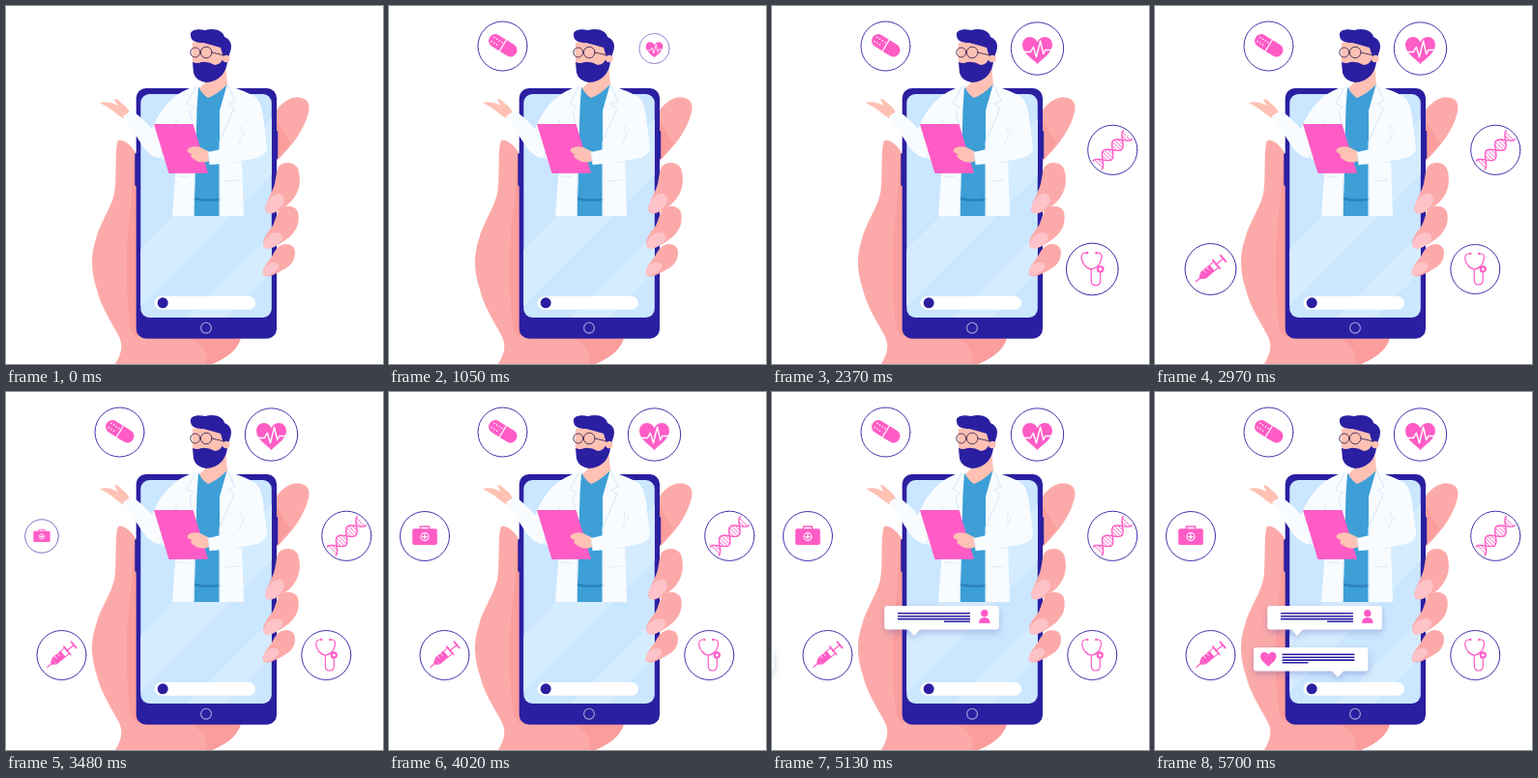
An HTML page with a canvas that plays this animation: 390 by 370 pixels, repeating every 6300 ms.

```html
<!DOCTYPE html>
<html lang="en">
<head>
<meta charset="utf-8">
<title>Online doctor</title>
<style>
html, body { margin: 0; width: 100%; height: 100%; overflow: hidden; background: #fff; }
canvas { display: block; width: 390px; height: 370px; }
</style>
</head>
<body>
<canvas id="stage" width="390" height="370"></canvas>
<script>
const ctx = document.getElementById('stage').getContext('2d');
const LOOP = 6300;
const NAVY = '#2b1fa1', PINK = '#ff5cc6', WHITE = '#fff';
const HAND = '#fcaaa9', HAND_DARK = '#fa9d9c', NAIL = '#fdc3c8';
const SKIN = '#fec1b4', COAT = '#f8fcff', FOLD = '#dcecfa', SHIRT = '#3d9fd6';

function fill(d, color) {
  ctx.fillStyle = color;
  ctx.fill(new Path2D(d));
}
function line(d, color, width = 1) {
  ctx.strokeStyle = color;
  ctx.lineWidth = width;
  ctx.stroke(new Path2D(d));
}
function box(x, y, w, h, r, color) {
  ctx.fillStyle = color;
  ctx.beginPath();
  ctx.roundRect(x, y, w, h, r);
  ctx.fill();
}
function disc(x, y, r, color) {
  ctx.fillStyle = color;
  ctx.beginPath();
  ctx.arc(x, y, r, 0, Math.PI * 2);
  ctx.fill();
}
function ring(x, y, r, color, width = 1) {
  ctx.strokeStyle = color;
  ctx.lineWidth = width;
  ctx.beginPath();
  ctx.arc(x, y, r, 0, Math.PI * 2);
  ctx.stroke();
}
function placed(x, y, scale, angle, draw) {
  ctx.save();
  ctx.translate(x, y);
  ctx.rotate(angle);
  ctx.scale(scale, scale);
  draw();
  ctx.restore();
}

// Soft start, 10% overshoot at two thirds of the way, then settle.
const clamp = x => Math.min(1, Math.max(0, x));
function pop(age, duration) {
  const rise = clamp(age / (duration * 2 / 3));
  const settle = clamp((age - duration * 2 / 3) / (duration / 3));
  const up = rise ** 3 * (10 - 15 * rise + 6 * rise * rise);
  return 1.1 * up - 0.1 * settle * settle * (3 - 2 * settle);
}

function drawPalm() {
  fill('M116 139C122 137 132 145 136 156V335H243C242 350 231 361 213 370H113C120 358 122 350 115 338C108 325 98 310 94 293C88 275 87 258 93 241C97 224 108 211 112 194C115 179 112 148 116 139Z', HAND);
  fill('M134 152C130 165 132 190 128 215C123 255 124 300 129 335L136 343V152Z', HAND_DARK);
  fill('M190 343H243C241 352 232 363 213 370H207C210 357 202 349 190 343Z', HAND_DARK);
  fill('M278 111C284 100 296 92 306 95C314 97 315 105 312 113C308 128 296 145 279 161Z', HAND);
  fill('M278 115C284 122 288 135 295 141L279 160Z', HAND_DARK);
}

function drawPhone() {
  box(133.3, 152, 3, 34, 1.5, NAVY);
  box(278.5, 129, 2.7, 29, 1.2, NAVY);
  box(134.7, 85, 145.3, 258.7, 10, NAVY);
  ctx.save();
  ctx.beginPath();
  ctx.roundRect(139.3, 91, 135.5, 231, 9);
  ctx.clip();
  ctx.fillStyle = '#cbe6ff';
  ctx.fillRect(139, 90, 136, 233);
  fill('M139 252L275 116V174L139 310Z M188 322L275 235V274L227 322Z', '#d5ecff');
  ctx.restore();
  ring(207, 332.7, 5.4, '#aaa5dd', 1.1);
  box(153.5, 300, 104.5, 13.7, 6.8, WHITE);
  disc(162.2, 306.8, 5.5, NAVY);
}

function drawFingers() {
  fill('M277 187C280 178 279 169 283 165C288 160 299 161 302 168C306 180 304 192 295 202C288 209 274 218 269 213C266 207 273 198 277 187Z', HAND);
  fill('M269 213C267 204 273 196 281 194C288 193 290 201 285 207C279 213 273 216 269 213Z', NAIL);
  fill('M276 227C280 219 280 211 286 208C292 206 300 207 302 213C304 222 302 231 293 239C284 246 272 254 267 249C264 242 270 235 276 227Z', HAND);
  fill('M267 249C266 242 271 235 279 234C286 234 288 239 284 244C278 249 271 253 267 249Z', NAIL);
  fill('M275 259C279 251 282 247 289 246C295 246 299 249 299 255C299 264 294 269 286 273C279 277 270 282 266 278C264 272 270 266 275 259Z', HAND);
  fill('M266 278C265 271 270 265 277 265C283 265 284 270 280 273C275 277 270 280 266 278Z', NAIL);
}

function drawHead() {
  fill('M205 70L227 60L229 81Q219 91 209 95Q203 91 200 85L206 79Z', SKIN);
  fill('M193 38Q211 32 228 40V62L221 72H197Q191 58 193 38Z', SKIN);
  fill('M193 58Q198 60 202 58Q209 57 216 61Q223 60 225 53L229 58Q228 66 223 72Q216 79 207 79Q196 77 194 69Z', NAVY);
  fill('M191 30C190 25 198 23 206 25C216 22 225 26 226 32C233 35 235 41 231 50L230 55L225 53L222 43Q212 40 204 38C196 38 191 36 191 30Z', NAVY);
  disc(227.8, 54.5, 3.8, SKIN);
  ring(195.8, 48, 5, '#54385f');
  ring(207.2, 48, 5.8, '#54385f');
  line('M200.6 47.5Q201 46.8 201.5 47.5M213 48L226 51', '#54385f');
}

function drawDoctor() {
  fill('M97 100C103 98 110 100 116 103L112 97C113 95 117 97 119 100L124 104L129 111L121 116C115 113 110 107 104 104Z', SKIN);
  fill('M121 114L130 108Q143 117 151 127Q160 105 174 94Q183 87 198 82H228Q246 87 258 94Q266 101 267 126L270 147Q268 156 254 158L244 160L246 217H172L176 164L160 157Q151 157 143 147Q132 130 121 114Z', COAT);
  fill('M199 84Q211 95 229 80L221 108V217H194.5L197.5 105Z', SHIRT);
  line('M195 199Q207 202 220.5 200', '#2c82bc', 2.4);
  line('M196 84L187 101L194 104L190 109L196 134L194 217M229 81L237 98L230 101L236 106L221 140V217', FOLD, 1.2);
  line('M177 118L171 128M244 124L242 148L211 156M246 160L237 162M178 176L190 177M227 181L241 180M160 157L164 145', FOLD, 1.2);
  fill('M153 122H193.5L209 172.7L168.5 173Z', PINK);
  fill('M211 151L201 146Q192 144 188 148Q186 151 192 153Q190 156 194 158Q201 164 211 160Z', SKIN);
  fill('M209 151Q225 148 239 142L248 119L267 124L270 147Q269 155 257 157Q232 163 211 164Z', COAT);
  line('M209 151L211 164M241 142L248 128', FOLD, 1);
  drawHead();
}

const HEART = 'M0 14C-5 9-15 3-15-5C-15-14-4-16 0-8C4-16 15-14 15-5C15 3 5 9 0 14Z';

function drawPill() {
  placed(0.3, -0.7, 1, 0.56, () => {
    box(-16, -6.8, 15.4, 13.6, [6.5, 0, 0, 6.5], PINK);
    box(0.6, -6.8, 15.4, 13.6, [0, 6.5, 6.5, 0], PINK);
    for (let i = 0; i < 7; i++) disc(-12 + (i >> 1) * 3.2, i % 2 ? 2.7 : -2.3, 0.8, WHITE);
  });
}

function drawHeart() {
  placed(0, 1.5, 1.03, 0, () => {
    fill(HEART, PINK);
    line('M-16 2H-7L-4-3L-1 7L3-9L6 4L8 0H16', WHITE, 1.4);
  });
}

// Two full loops with open, flaring ends.
function drawDna() {
  placed(0, 0, 1, -Math.PI / 4, () => {
    const reach = 22;
    const wave = x => 6.3 * Math.sin(x * Math.PI / 14.5);
    for (const side of [1, -1]) {
      ctx.beginPath();
      for (let x = -reach; x <= reach; x++) ctx.lineTo(x, side * wave(x));
      ctx.strokeStyle = PINK;
      ctx.lineWidth = 1.4;
      ctx.stroke();
    }
    for (let x = -20.3; x < reach; x += 2.9) line(`M${x} ${wave(x)}V${-wave(x)}`, PINK, 0.9);
  });
}

function drawStethoscope() {
  line('M-5-16H-7Q-11-16-10.5-10Q-8-1-1 0Q7-1 9-10Q10-16 6-16H4M-1 0V11Q-1 16 3.5 16Q8 16 8 11V4', PINK, 1.2);
  ring(8, 0, 2.6, PINK, 2.1);
  disc(-5, -16, 1.2, PINK);
  disc(4, -16, 1.2, PINK);
}

function drawSyringe() {
  placed(0, 0, 1, -0.7, () => {
    line('M-19 0H-13M7 0H16', PINK, 1.3);
    fill('M-14-1L-10-4V4L-14 1Z', PINK);
    box(-10, -4.2, 12, 8.4, 0.5, PINK);
    line('M2-3.7H7M2 3.7H7', PINK, 1);
    line('M7.5-5.3V5.3M16.5-4V4', PINK, 1.8);
    line('M-6-3.5V-1M-2-3.5V-1', WHITE, 0.8);
  });
}

function drawKit() {
  box(-12.8, -7.8, 25.6, 16.8, 1.8, PINK);
  line('M-4.5-8V-10H4.5V-8', PINK, 1.5);
  ring(0, 0.6, 4, WHITE, 1.1);
  line('M-2 .6H2M0-1.4V2.6', WHITE, 1.4);
}

const badges = [
  { start: 120, x: 117.5, y: 41.5, r: 25.5, draw: drawPill },
  { start: 795, x: 274.5, y: 44, r: 27.2, draw: drawHeart },
  { start: 1355, x: 352.3, y: 148.8, r: 25.6, draw: drawDna },
  { start: 1960, x: 331.3, y: 272, r: 25.5, draw: drawStethoscope },
  { start: 2570, x: 57.5, y: 272, r: 25.5, draw: drawSyringe },
  { start: 3200, x: 37, y: 149, r: 25.5, draw: drawKit }
];

function drawBadge(badge, t) {
  const scale = pop(t - badge.start, 750);
  if (scale <= 0) return;
  placed(badge.x, badge.y, scale, 0, () => {
    disc(0, 0, badge.r, WHITE);
    ring(0, 0, badge.r, NAVY, 0.9);
    badge.draw();
  });
}

function drawBubble(x, y, tail) {
  ctx.save();
  ctx.shadowColor = 'rgba(70,65,165,0.28)';
  ctx.shadowBlur = 7;
  ctx.shadowOffsetY = 3;
  fill(`M${x + 3} ${y}h112.5q3 0 3 3v18.5q0 3-3 3H${tail + 6}l-6 6.5l-6-6.5H${x + 3}q-3 0-3-3v-18.5q0-3 3-3Z`, WHITE);
  ctx.restore();
}
function drawText(x, y, shortX, shortWidth) {
  for (let i = 0; i < 3; i++) box(x, y + i * 2.9, 75, 1.6, 0.5, NAVY);
  box(shortX, y + 8.5, shortWidth, 1.6, 0.5, NAVY);
}
function drawQuestion() {
  drawBubble(116.3, 221, 147);
  drawText(130, 228, 178, 27);
  disc(219.8, 228.8, 3.7, PINK);
  fill('M214 239Q214 233 219.8 233Q225.6 233 225.6 239Z', PINK);
}
function drawReply() {
  drawBubble(102, 264, 189);
  drawText(131.5, 270.5, 131.5, 27);
  placed(117.3, 276, 0.55, 0, () => fill(HEART, PINK));
}
function slideIn(t, start, duration, travel, draw) {
  if (t < start) return;
  placed(travel * (pop(t - start, duration) - 1), 0, 1, 0, draw);
}

function render(t) {
  ctx.fillStyle = WHITE;
  ctx.fillRect(0, 0, 390, 370);
  drawPalm();
  drawPhone();
  drawDoctor();
  drawFingers();
  for (const badge of badges) drawBadge(badge, t);
  slideIn(t, 3960, 780, 245, drawQuestion);
  slideIn(t, 5080, 620, 222, drawReply);
}

const begin = performance.now();
function tick() {
  render((performance.now() - begin) % LOOP);
  requestAnimationFrame(tick);
}
ctx.lineCap = 'round';
ctx.lineJoin = 'round';
tick();
</script>
</body>
</html>
```
